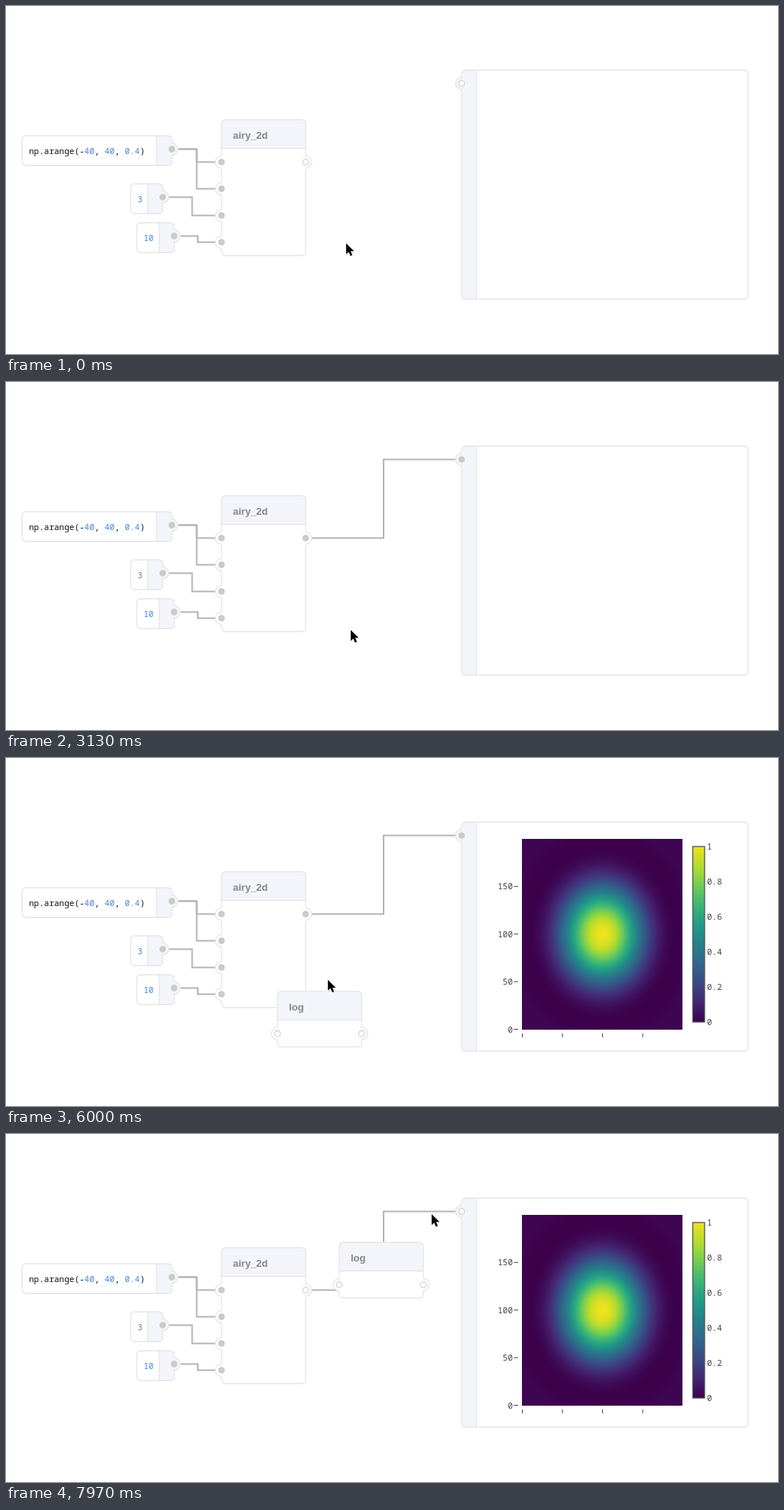
An HTML page that plays this animation: 1010x456 px, repeating every 8000 ms.

```html
<!DOCTYPE html>
<html lang="en">
<head>
<meta charset="utf-8">
<title>Node editor</title>
<style>
  html, body { margin: 0; width: 100%; height: 100%; overflow: hidden; background: #fff; }
  svg { display: block; width: 100vw; height: 100vh; }
  text { white-space: pre; }
  .mono { font: 11px "Noto Sans Mono", monospace; fill: #444; }
  .code { fill: #111; }
  .num { fill: #4a88d6; }
  .title { font: bold 13px "Liberation Sans", Arial, sans-serif; fill: #858589; }
  .wire { fill: none; stroke: #b4b4b4; stroke-width: 2; }
  .edge { fill: none; stroke: #e5e5e9; stroke-width: 1.3; }
  .tick { fill: none; stroke: #444; }
</style>
</head>
<body>
<svg id="stage" viewBox="0 0 1010 456"></svg>
<script>
const LOOP = 8000;
const PALE = '#f4f5fb';
const stage = document.getElementById('stage');

// ---------- markup helpers ----------
const text = (x, y, s, cls, extra = '') => `<text x="${x}" y="${y}" class="${cls}" ${extra}>${s}</text>`;
const wirePath = (x1, y1, x2, y2) => `M${x1} ${y1}H${(x1 + x2) / 2}V${y2}H${x2}`;
const wire = (...p) => `<path class="wire" d="${wirePath(...p)}"/>`;

// side: 1 = bulges to the right, 0 = to the left
function port(x, y, side, fill, id = '', full = true) {
  return `<circle cx="${x}" cy="${y}" r="8" fill="${fill}"/>
    <path class="edge" d="M${x} ${y - 8}A8 8 0 0 ${side} ${x} ${y + 8}"/>
    <circle ${id && `id="${id}"`} cx="${x}" cy="${y}" r="3.8" fill="${full ? '#cacaca' : '#fff'}"
      stroke="#cacaca" stroke-width="1.1"/>`;
}

function box(x, y, w, h, inner = '') {
  const r = `x="${x}" y="${y}" width="${w}" height="${h}" rx="5"`;
  return `<rect ${r} fill="#fff"/>${inner}<rect ${r} class="edge"/>`;
}

function node(x, y, w, h, name) {
  const header = `<path fill="${PALE}" d="M${x} ${y + 37.5}v-32.5q0-5 5-5h${w - 10}q5 0 5 5v32.5z"/>
    <path class="edge" d="M${x} ${y + 37.5}h${w}"/>`;
  return box(x, y, w, h, header) + text(x + 15, y + 25, name, 'title');
}

function value(x, y, right, split, label, textX) {
  const strip = `<path fill="${PALE}" d="M${split} ${y}H${right - 5}q5 0 5 5v29q0 5 -5 5H${split}z"/>
    <path class="edge" d="M${split} ${y}v39"/>`;
  return box(x, y, right - x, 39, strip) + port(right, y + 17.5, 1, PALE)
    + text(textX, y + 24, label, 'mono code');
}

// ---------- diffraction plot ----------
const ramp = ['#3d004b', '#432673', '#3a4884', '#2f678a', '#26808a', '#219c86', '#3ab577', '#71cc56', '#b4dc2c', '#f0e11d']
  .map(c => [1, 3, 5].map(i => parseInt(c.slice(i, i + 2), 16)));

function colour(v) {
  const p = Math.min(v, 0.9999) * 9, i = Math.floor(p);
  return `rgb(${ramp[i].map((a, k) => Math.round(a + (ramp[i + 1][k] - a) * (p - i)))})`;
}

function airy(q) {
  if (q < 1e-6) return 1;
  let j1 = 0;
  for (let i = 0; i < 200; i++) {
    const a = (i + 0.5) * Math.PI / 200;
    j1 += Math.cos(a - q * Math.sin(a)) / 200;
  }
  return (2 * j1 / q) ** 2;
}

const stops = (n, f) => Array.from({ length: n + 1 },
  (_, i) => `<stop offset="${i / n}" stop-color="${colour(f(i / n))}"/>`).join('');

const plot = `<defs>
    <radialGradient id="disk" gradientUnits="userSpaceOnUse" cx="0" cy="0" r="5.7"
      gradientTransform="translate(780 231) scale(26.25 31.2)">${stops(60, u => airy(u * 5.7))}</radialGradient>
    <linearGradient id="scale" x1="0" y1="1" x2="0" y2="0">${stops(9, u => u)}</linearGradient>
  </defs>
  <rect x="675" y="106" width="210" height="250" fill="url(#disk)"/>
  <rect x="898.5" y="116" width="15.5" height="230" fill="url(#scale)" stroke="#555" stroke-width="1.3"/>`
  + [0, 1, 2, 3].map(i => {
    const y = 355.5 - i * 62.4, x = 675.5 + i * 52.5;
    return text(663, y + 4, i * 50, 'mono', 'text-anchor="end"')
      + `<path class="tick" d="M664.5 ${y}h5.5M${x} 361v5"/>`;
  }).join('')
  + [0, 1, 2, 3, 4, 5].map(i => text(917, 350 - i * 46, i / 5, 'mono')).join('');

// ---------- scene ----------
const num = s => `<tspan class="num">${s}</tspan>`;
stage.innerHTML =
  wire(225, 187.5, 274, 204.5) + wire(225, 187.5, 274, 239.5)
  + wire(213, 250.5, 274, 274.5) + wire(228, 301.5, 274, 309.5)
  + '<path id="link" class="wire"/>'
  + value(21, 170, 217, 197, `np.arange(-${num(40)}, ${num(40)}, ${num(0.4)})`, 30)
  + value(163, 233, 205, 185.5, num(3), 172)
  + value(171, 284, 220, 200.5, num(10), 180)
  + node(282, 149, 110, 178, 'airy_2d')
  + [204.5, 239.5, 274.5, 309.5].map(y => port(282, y, 0, '#fff')).join('')
  + port(392, 204.5, 1, '#fff', 'out')
  + box(596, 84, 375, 300, `<path fill="${PALE}" d="M615.5 84H601q-5 0-5 5v290q0 5 5 5h14.5z"/>
      <path class="edge" d="M615.5 84v300"/>`)
  + port(596, 101.5, 0, PALE, 'in')
  + `<g id="plot">${plot}</g>`
  + `<g id="log">${node(0, 0, 110, 73, 'log')}${port(0, 55.5, 0, '#fff', '', false)}${port(110, 55.5, 1, '#fff', '', false)}</g>`
  + `<g id="tip"><rect x="398" y="192" width="40" height="25" rx="5" fill="#fff" stroke="#f3f3f4"/>
      ${text(405.5, 208, 'airy', 'mono', 'style="fill:#adadad"')}</g>`
  + `<g id="cursor"><path d="M1 1.5v14l3.3-3 2.4 5.2 2.4-1-2.2-5h4.2z" fill="#000" opacity=".15"/>
      <path d="M0 0v14.2l3.3-3 2.3 5.2 2.5-1.1-2.2-5h4.4z" stroke="#fff" stroke-width="1.8" paint-order="stroke"/></g>`;

const [link, outDot, inDot, plotG, logG, tip, cursor] =
  ['link', 'out', 'in', 'plot', 'log', 'tip', 'cursor'].map(id => document.getElementById(id));

// ---------- motion: [ms, x, y] ----------
const pointer = [
  [0, 445, 311], [20, 445, 311], [600, 392, 200], [790, 392, 200], [830, 394, 201],
  [1500, 394, 201], [2110, 593, 97], [2310, 593, 97], [2500, 451, 325], [3830, 451, 325],
  [4500, 440, 475], [5500, 340, 490], [6000, 421, 291], [6430, 485, 165], [6700, 484, 150],
  [6800, 484, 150], [7300, 594, 98], [7700, 594, 98], [7970, 557, 105], [8000, 553, 106]
];
const logMove = [[5500, 290, 478], [6000, 355, 306], [6430, 437, 159], [6700, 436, 142]];

// Smooth curve through the keys that never overshoots them
function along(keys, t) {
  const last = keys.length - 1;
  if (t <= keys[0][0]) return keys[0].slice(1);
  if (t >= keys[last][0]) return keys[last].slice(1);
  const i = keys.findIndex(k => k[0] > t) - 1;
  const span = keys[i + 1][0] - keys[i][0], u = (t - keys[i][0]) / span;
  return [1, 2].map(c => {
    const slope = n => n < 0 || n >= last ? 0 : (keys[n + 1][c] - keys[n][c]) / (keys[n + 1][0] - keys[n][0]);
    const tangent = n => {
      const a = slope(n - 1), b = slope(n);
      return a * b > 0 ? 2 * a * b / (a + b) : 0;
    };
    const a = keys[i][c], b = keys[i + 1][c];
    return a + (b - a) * u * u * (3 - 2 * u)
      + span * u * (1 - u) * (tangent(i) * (1 - u) - tangent(i + 1) * u);
  });
}

const show = (el, on) => el.setAttribute('visibility', on ? 'visible' : 'hidden');
const looks = { open: ['#fff', '#cacaca'], full: ['#cacaca', '#cacaca'], hover: ['#555', '#555'] };
function dot(el, look) {
  el.setAttribute('fill', looks[look][0]);
  el.setAttribute('stroke', looks[look][1]);
}

function draw(t) {
  const [x, y] = along(pointer, t);
  cursor.setAttribute('transform', `translate(${x} ${y})`);
  logG.setAttribute('transform', `translate(${along(logMove, t)})`);
  show(logG, t > 5500);
  show(plotG, t >= 3825);
  show(tip, t > 1000 && t < 1515);
  tip.setAttribute('opacity', Math.min(1, Math.max(0, (t - 1000) / 200)));

  show(link, t >= 1515);
  const end = t < 2110 ? [x - 5, y + 4.5] : [588, 101.5];
  link.setAttribute('d', wirePath(400, 204.5, Math.max(400, end[0]), end[1]));

  const joined = t >= 2250 && t < 7700;
  dot(outDot, joined ? 'full' : t > 540 && t < 1515 ? 'hover' : 'open');
  dot(inDot, t > 7260 && t < 7700 ? 'hover' : joined ? 'full' : 'open');
}

function frame() {
  draw(performance.now() % LOOP);
  requestAnimationFrame(frame);
}
frame();
</script>
</body>
</html>
```
